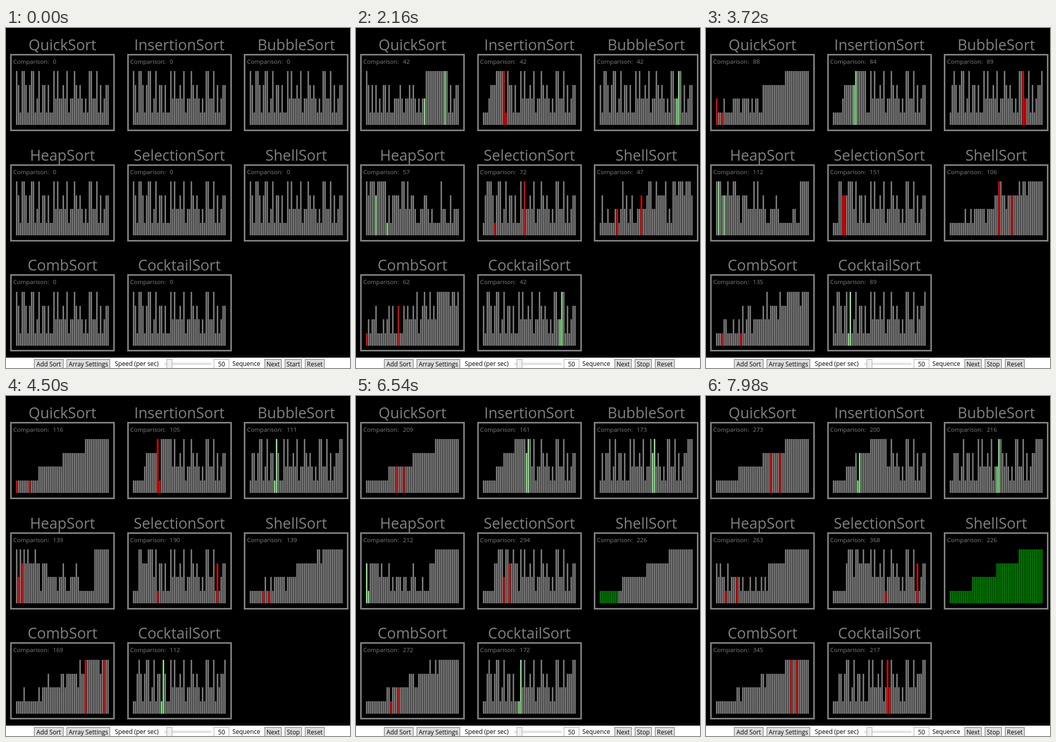
Animation, 664 px wide and 656 px high, one loop 8 s. Source, as an HTML page with a canvas:

```html
<!DOCTYPE html>
<html lang="en">
<head>
<meta charset="utf-8">
<title>Sorting algorithms</title>
<style>
  html, body { margin: 0; width: 100%; height: 100%; overflow: hidden; background: #000; }
  canvas { display: block; }
</style>
</head>
<body>
<canvas id="stage" width="664" height="656"></canvas>
<script>
const ctx = document.getElementById('stage').getContext('2d');
const START = [...'43144313441241331311424223241224323212144224131233'].map(Number);
const N = START.length;
const LOOP = 8000, TICK = 60, PRESSED_AT = 300, SORT_AT = 720;
const GRAY = '#808080', COMPARE = '#ff0000', SWAP = '#90ee90', DONE = '#008000';
const FONT = '"Open Sans", "Noto Sans", sans-serif';
const BAR_TOP = [187, 163, 136, 110, 83], BAR_BASE = 187;

// Sorting steps reached after a number of ticks; the timer drifts a little.
const PACE = [[0, 1], [6, 16], [24, 73], [50, 154], [77, 237], [97, 300], [121, 375]];

// Each sort gets gt(i, j) and swap(i, j), which both record one visible step.
const SORTS = {
  QuickSort({ gt, swap }) {
    (function sort(lo, hi) {
      if (lo >= hi) return;
      let store = lo;
      for (let j = lo + 1; j <= hi; j++) if (gt(lo, j)) swap(++store, j);
      swap(lo, store);
      sort(lo, store - 1);
      sort(store + 1, hi);
    })(0, N - 1);
  },
  InsertionSort({ gt, swap }) {
    for (let i = 1; i < N; i++)
      for (let j = i; j > 0 && gt(j - 1, j); j--) swap(j - 1, j);
  },
  BubbleSort({ gt, swap }) {
    for (let end = N - 1; end > 0; end--)
      for (let j = 0; j < end; j++) if (gt(j, j + 1)) swap(j, j + 1);
  },
  HeapSort({ gt, swap, exchange }) {
    function sift(parent, size) {
      const left = 2 * parent + 1, right = left + 1;
      let largest = parent;
      if (left < size && gt(left, largest)) largest = left;
      if (right < size && gt(right, largest)) largest = right;
      if (largest === parent) return;
      swap(parent, largest);
      sift(largest, size);
    }
    for (let i = N / 2 - 1; i >= 0; i--) sift(i, N);
    for (let end = N - 1; end > 0; end--) {
      exchange(0, end);
      sift(0, end);
    }
  },
  SelectionSort({ gt, swap }) {
    for (let i = 0; i < N; i++) {
      let min = i;
      for (let j = i; j < N; j++) if (gt(min, j)) min = j;
      swap(i, min);
    }
  },
  ShellSort({ gt, swap }) {
    for (let gap = N >> 2; gap > 0; gap >>= 1) {
      gap |= 1;
      for (let first = 0; first < gap; first++)
        for (let i = first + gap; i < N; i += gap)
          for (let j = i; j >= gap && gt(j - gap, j); j -= gap) swap(j - gap, j);
    }
  },
  CombSort({ gt, swap }) {
    let shrunk = N, swapped = true;
    while (shrunk > 1 || swapped) {
      shrunk = Math.max(1, shrunk / 1.3);
      const gap = Math.floor(shrunk);
      swapped = false;
      for (let i = 0; i + gap < N; i++)
        if (gt(i, i + gap)) { swap(i, i + gap); swapped = true; }
    }
  },
  CocktailSort({ gt, swap }) {
    let lo = 0, hi = N - 1;
    while (lo < hi) {
      let last = lo;
      for (let j = lo; j < hi; j++) if (gt(j, j + 1)) { swap(j, j + 1); last = j; }
      hi = last;
      for (let j = hi - 1; j >= lo; j--) if (gt(j, j + 1)) { swap(j, j + 1); last = j + 1; }
      lo = last;
    }
  }
};

function record(sort) {
  const values = [...START], steps = [];
  let count = 0;
  const snap = (color, ...marked) => steps.push({ values: [...values], count, color, marked });
  const exchange = (i, j) => { [values[i], values[j]] = [values[j], values[i]]; };
  snap(GRAY);
  sort({
    exchange,
    gt(i, j) { count++; snap(COMPARE, i, j); return values[i] > values[j]; },
    swap(i, j) { exchange(i, j); snap(SWAP, i, j); }
  });
  for (let i = 1; i <= N; i++) snap(DONE, ...Array(i).keys());
  return steps;
}

const panels = Object.entries(SORTS).map(([title, sort], i) =>
  ({ title, steps: record(sort), col: i % 3, row: Math.floor(i / 3) }));

function stepAt(time) {
  if (time < SORT_AT) return 0;
  const tick = Math.floor((time - SORT_AT) / TICK);
  const next = Math.max(1, PACE.findIndex(([t]) => t >= tick));
  const [t0, s0] = PACE[next - 1], [t1, s1] = PACE[next];
  return Math.floor(s0 + (s1 - s0) * (tick - t0) / (t1 - t0) + 1e-6);
}

function rect(x, y, w, h, color) {
  ctx.fillStyle = color;
  ctx.fillRect(x, y, w, h);
}

function frame(x, y, w, h, fill, border) {
  rect(x, y, w, h, border);
  rect(x + 1, y + 1, w - 2, h - 2, fill);
}

function text(str, x, y, size, color, align = 'left') {
  ctx.font = `${size}px ${FONT}`;
  ctx.textAlign = align;
  ctx.fillStyle = color;
  ctx.fillText(str, x, y);
}

function drawPanel({ title, steps, col, row }, step) {
  const { values, count, color, marked } = steps[Math.min(step, steps.length - 1)];
  const dx = 225.6 * col, dy = Math.round(212.6 * row), barDy = Math.ceil(212.6 * row);
  text(title, 109 + dx, 43 + dy, 28.7, GRAY, 'center');
  ctx.strokeStyle = GRAY;
  ctx.lineWidth = 3;
  ctx.strokeRect(Math.round(8 + dx) + 1.5, 51.5 + dy, 199, 146);
  text('Comparison:', 14 + dx, 69 + dy, 11.6, GRAY);
  text(count, 90.5 + dx, 69 + dy, 11.6, GRAY);
  values.forEach((v, i) => rect(19.3 + dx + 3.6 * i, BAR_TOP[v] + barDy, 2.7,
    BAR_BASE - BAR_TOP[v], marked.includes(i) ? color : GRAY));
}

function button(label, left, right) {
  frame(left, 639, right - left, 18, '#dddddd', '#707070');
  text(label, (left + right) / 2, 653, 11.8, '#000', 'center');
}

function drawToolbar(running) {
  rect(0, 636, 664, 20, '#fff');
  button('Add Sort', 54, 111);
  button('Array Settings', 117, 201);
  text('Speed (per sec)', 210, 652, 11.9, '#000');
  frame(306, 646, 90, 4, '#e7eaea', '#d6d6d6');
  frame(310, 639, 11, 18, '#f0f0f0', '#acacac');
  frame(401, 639, 30, 18, '#fff', '#abadb3');
  text('50', 416, 653, 11.8, '#000', 'center');
  text('Sequence', 437, 652, 11.8, '#000');
  button('Next', 499, 532);
  button(running ? 'Stop' : 'Start', 538, 571);
  button('Reset', 577, 615);
}

const began = performance.now();
function draw() {
  const time = Math.max(0, performance.now() - began) % LOOP;
  const step = stepAt(time);
  rect(0, 0, 664, 656, '#000');
  panels.forEach(panel => drawPanel(panel, step));
  drawToolbar(time >= PRESSED_AT);
  requestAnimationFrame(draw);
}
draw();
</script>
</body>
</html>
```
